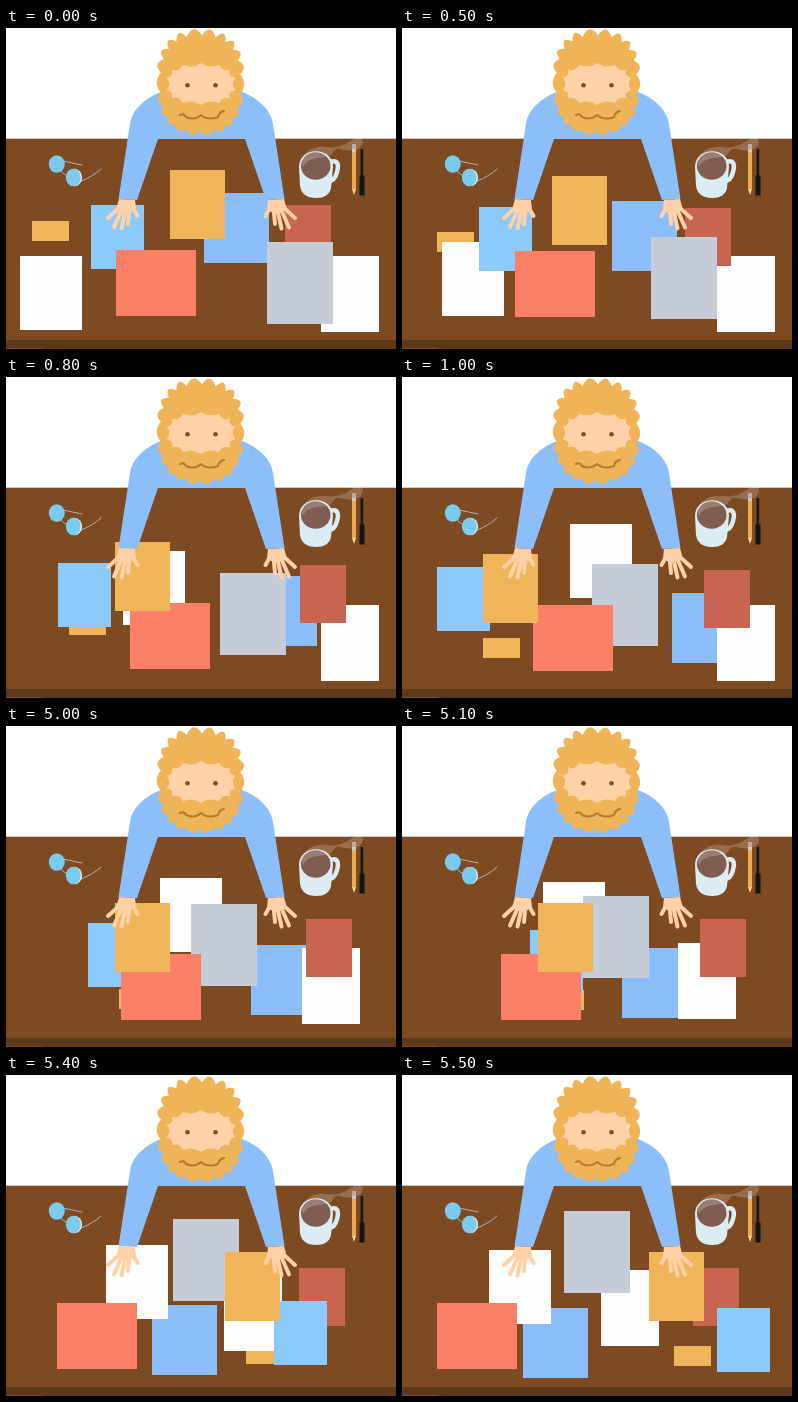
An HTML page with a canvas that plays this animation: 390x321 px, repeating every 8000 ms.

```html
<!DOCTYPE html>
<html lang="en">
<head>
<meta charset="utf-8">
<title>Desk</title>
<style>
html, body { margin: 0; width: 100%; height: 100%; overflow: hidden; background: #fff; }
canvas { display: block; width: 390px; height: 321px; }
</style>
</head>
<body>
<canvas id="stage"></canvas>
<script>
const W = 390, H = 321, LOOP = 8000, SHUFFLES = [500, 5000];
const STEP = 100, STEPS = 6;
const SKIN = '#fed1a6', HAIR = '#efb457', SHIRT = '#8bbefb', WOOD = '#7d4a21';
const CHINA = '#dcecf4', LENS = '#7acbf0', WIRE = '#a9b2b6';

const canvas = document.getElementById('stage');
const ratio = window.devicePixelRatio || 1;
canvas.width = W * ratio;
canvas.height = H * ratio;
const ctx = canvas.getContext('2d');
ctx.scale(ratio, ratio);

// Back to front: colour, size, then the place before and after each shuffle.
const papers = [
  ['#8bbdfa', [65, 70], [198, 165], [270, 216], [121, 233]],
  ['#f0b55a', [37, 20], [26, 193], [81, 261], [272, 271]],
  ['#fefefe', [62, 74], [14, 228], [168, 147], [87, 175]],
  ['#fefefe', [58, 76], [315, 228], [315, 228], [199, 195]],
  ['#c76551', [46, 58], [279, 177], [302, 193], [291, 193]],
  ['#c5ccd8', [66, 82], [261, 214], [190, 187], [162, 136]],
  ['#8ccafc', [53, 64], [85, 177], [35, 190], [315, 233]],
  ['#fc8068', [80, 66], [110, 222], [131, 228], [35, 228]],
  ['#f0b55a', [55, 69], [164, 142], [81, 177], [247, 177]]
];

function rect(color, x, y, w, h) {
  ctx.fillStyle = color;
  ctx.fillRect(x, y, w, h);
}

function ellipse(color, x, y, rx, ry = rx) {
  ctx.fillStyle = color;
  ctx.beginPath();
  ctx.ellipse(x, y, rx, ry, 0, 0, Math.PI * 2);
  ctx.fill();
}

function fill(color, d) {
  ctx.fillStyle = color;
  ctx.fill(new Path2D(d));
}

function stroke(color, width, d) {
  ctx.strokeStyle = color;
  ctx.lineWidth = width;
  ctx.lineCap = ctx.lineJoin = 'round';
  ctx.stroke(new Path2D(d));
}

// Rounded-square ring of n lobes; bulge(angle) is each lobe's height.
function scallop(color, cx, cy, rx, ry, n, phase, bulge) {
  const soft = v => Math.sign(v) * Math.abs(v) ** 0.8;
  const angle = i => phase + i / n * Math.PI * 2;
  const point = i => [cx + rx * soft(Math.cos(angle(i))), cy + ry * soft(Math.sin(angle(i)))];
  ctx.fillStyle = color;
  ctx.beginPath();
  ctx.moveTo(...point(0));
  for (let i = 0; i < n; i++) {
    const [x, y] = point(i), [nx, ny] = point(i + 1);
    const k = 2 * bulge(angle(i + 0.5)) / Math.hypot(nx - x, ny - y);
    ctx.quadraticCurveTo((x + nx) / 2 + (ny - y) * k, (y + ny) / 2 - (nx - x) * k, nx, ny);
  }
  ctx.fill();
}

function mirrored(draw) {
  draw();
  ctx.save();
  ctx.translate(391, 0);
  ctx.scale(-1, 1);
  draw();
  ctx.restore();
}

function table() {
  rect('#ffffff', 0, 0, W, H);
  rect(WOOD, 0, 110.7, W, 202);
  rect('#5d391b', 0, 312, W, 9);
  rect(WOOD, 0, 320, 36, 1);
}

function glasses() {
  stroke(WIRE, 1, 'M57 133L76 137M54 142Q58 147 62 148M75 153Q86 149 95 141');
  ellipse(LENS, 50.8, 136, 8, 8.8);
  ellipse('#e2edf0', 68.3, 149.5, 7.8, 8.8);
  ellipse(LENS, 67.3, 149.5, 7.4, 8.8);
}

function cup() {
  stroke(CHINA, 4.5, 'M324 134C332 131 333 137 331 144Q329 153 322 153');
  fill(CHINA, 'M293 139C293 118 327 118 327 139L325 160Q323 170 310 170Q296 170 294 158Z');
  ellipse('#805d51', 309.7, 138, 14.8, 13.8);
  fill('rgba(255,255,255,.2)',
    'M297 139C292 127 306 117 320 119S342 115 349 110Q357 109 357 114' +
    'C354 125 342 123 334 121S329 128 320 129S301 130 297 139Z');
}

function pens() {
  rect('#c6a99b', 346, 116, 4, 5);
  rect('#c5cbd0', 346, 121, 4, 3);
  rect('#edab51', 346, 124, 4, 37);
  fill('#f9d3a4', 'M346 161H350L348 167Z');
  rect('#191919', 354.5, 121, 2.7, 28);
  rect('#141414', 353.5, 147.5, 5, 20);
}

function arm() {
  fill(SHIRT, 'M196 64H155C139 70 126 82 124 96L112.5 171L131 172L152 111H196Z');
  fill(SKIN, 'M113 171L129 172L130 181Q122 189 110 182Z');
  const tips = [[102, 190], [108, 199.5], [115.5, 200.5], [122, 196], [131.5, 188]];
  tips.forEach(([x, y], i) => stroke(SKIN, 4, `M${113 + i * 3.5} 180L${x} ${y}`));
}

function head() {
  const crown = a => 4 + 3 * Math.max(0, -Math.sin(a));
  scallop(HAIR, 194.5, 55.5, 40, 48, 22, -1.84, crown);
  scallop(SKIN, 195, 56, 35, 21, 14, -1.57, () => -2.6);
  for (const x of [181.5, 209.5]) ellipse('#804c25', x, 57.3, 2.3);
  stroke('#af7c35', 2, 'M174 87Q178 85 180 89Q188 93 195 87Q202 93 212 89Q213 84 218 83');
}

function progress(t, start) {
  const k = Math.floor((t - start) / STEP) + 1;
  return Math.max(0, Math.min(STEPS, k)) / STEPS;
}

function draw(t) {
  table();
  glasses();
  cup();
  pens();
  const turn = t < SHUFFLES[1] ? 0 : 1;
  const p = progress(t, SHUFFLES[turn]);
  for (const [color, size, ...stops] of papers) {
    const from = stops[turn], to = stops[turn + 1];
    // Half pixels settle towards the top left.
    const [x, y] = from.map((v, i) => Math.ceil(v + (to[i] - v) * p - 0.501));
    rect(color, x, y, ...size);
  }
  mirrored(arm);
  head();
}

const begin = performance.now();
function frame() {
  draw((performance.now() - begin) % LOOP);
  requestAnimationFrame(frame);
}
frame();
</script>
</body>
</html>
```
